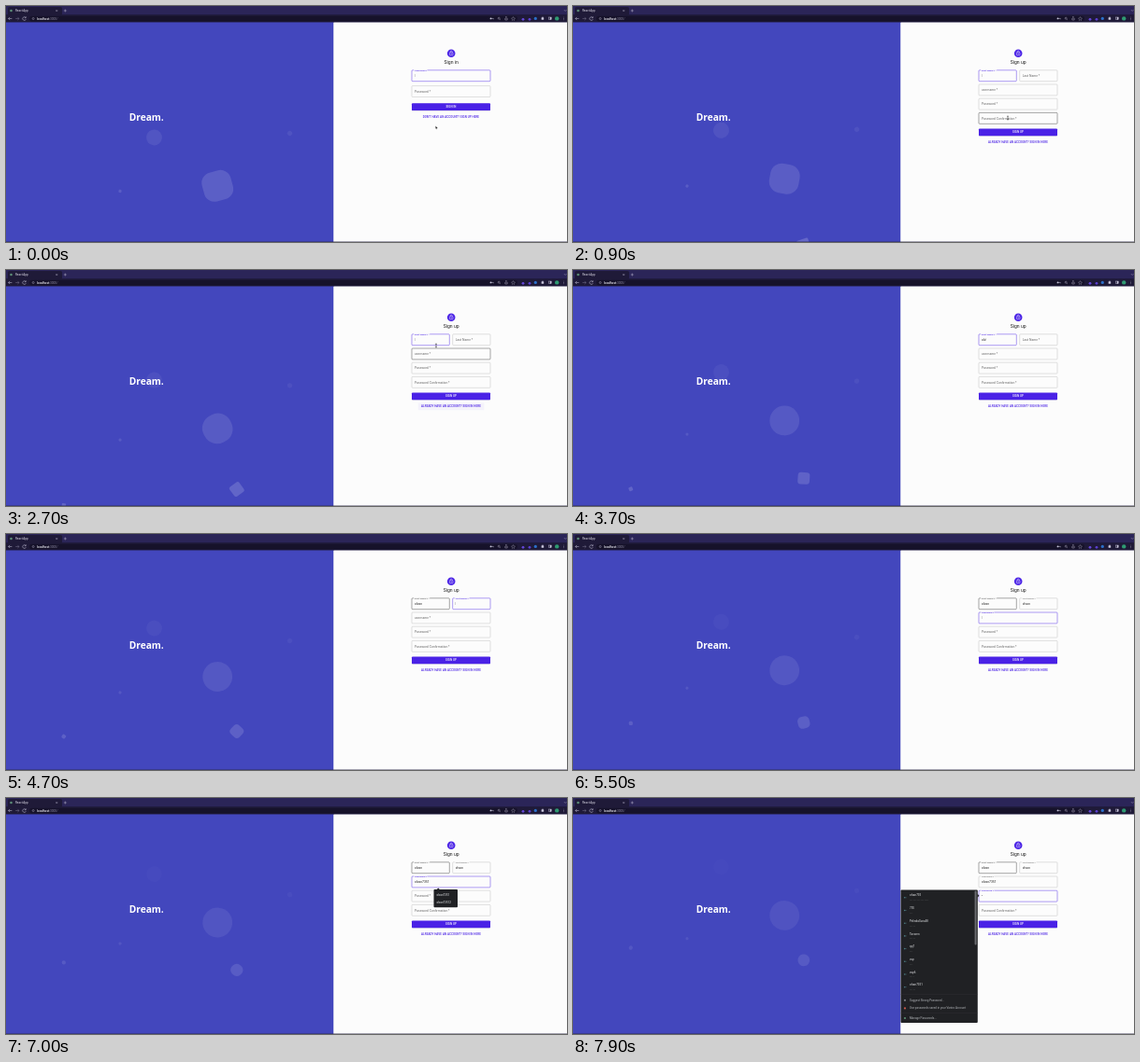
Animation, 600 px wide and 253 px high, one loop 8000 ms. Source, as an HTML page:

```html
<!DOCTYPE html>
<html lang="en">
<head>
<meta charset="utf-8">
<title>Sign up</title>
<style>
  html, body { margin: 0; width: 100%; height: 100%; overflow: hidden; background: #fcfcfc; }
  svg { display: block; width: 100vw; height: 100vh; }
  text { font-family: Roboto, "Liberation Sans", sans-serif; white-space: pre; }
</style>
</head>
<body>
<svg viewBox="0 0 600 253" preserveAspectRatio="none">
  <defs><clipPath id="panel"><rect y="17.5" width="350.5" height="235"/></clipPath></defs>
  <g id="backdrop"></g>
  <g id="bubbles" clip-path="url(#panel)"></g>
  <text x="150.2" y="123.3" text-anchor="middle" fill="#fff"
    style="font: 700 10.2px 'Open Sans', 'Noto Sans', sans-serif">Dream.</text>
  <g id="form"></g>
  <g id="overlay"></g>
</svg>
<script>
const LOOP = 8000, STEP = 100, CSS_PX = 0.212;
const PRIMARY = '#4a22e6', INK = '#222', PAPER = '#fcfcfc';
const layer = id => document.getElementById(id);
const clamp = (v, lo = 0, hi = 1) => Math.min(hi, Math.max(lo, v));

const rect = (x, y, w, h, fill, extra = '') =>
  `<rect x="${x}" y="${y}" width="${w}" height="${h}" fill="${fill}" ${extra}/>`;
const dot = (x, y, r, fill) => `<circle cx="${x}" cy="${y}" r="${r}" fill="${fill}"/>`;
const line = (d, stroke, width = 0.5, fill = 'none') =>
  `<path d="${d}" fill="${fill}" stroke="${stroke}" stroke-width="${width}"/>`;
// y is the vertical middle of the capitals
const text = (s, x, y, size, fill, extra = '') =>
  `<text x="${x}" y="${y + size * 0.36}" font-size="${size}" fill="${fill}" ${extra}>${s}</text>`;
const centered = 'text-anchor="middle"';

function drawBackdrop() {
  const pale = '#c9c6dc';
  return rect(0, 0, 600, 18, '#2b2558')
    + rect(0, 9.2, 600, 8.4, '#1f1a38')
    + rect(2, 1, 58, 9, '#1f1a38', 'rx="1.6"')
    + dot(5.5, 5, 1.3, '#5d8f78')
    + text('React App', 10, 5, 3, '#e6e4f0')
    + line('M53.4 4.2l1.7 1.7m0-1.7l-1.7 1.7M61.8 5h3M63.3 3.5v3', pale, 0.45)
    + line('M597 4.2l1.2 1.2l1.2-1.2', pale, 0.4)
    + line('M6.4 13.5h-3.8m1.6-1.6l-1.6 1.6l1.6 1.6', pale)
    + line('M10.2 13.5h3.8m-1.6-1.6l1.6 1.6l-1.6 1.6', '#77728f')
    + line('M21.1 12.6a1.8 1.8 0 1 0 .2 1.5m0-2.8v1.4h-1.4', pale)
    + rect(25, 10.8, 522, 5.6, '#16122a', 'rx="2.8"')
    + line('M28.2 13.5a1 1 0 1 0 2 0a1 1 0 1 0-2 0', pale, 0.4)
    + text('localhost:<tspan fill="#8b87a0" font-weight="400">3000/</tspan>', 33, 13.5, 3.2, '#f2f1f7', 'font-weight="500"')
    + dot(518.5, 13.4, 0.9, pale) + line('M519 13.4h2.3v.9', pale)
    + line('M526.2 13.2a1 1 0 1 0 2 0a1 1 0 1 0-2 0m1.7.8l.9.9', pale, 0.4)
    + line('M533.8 13v2h2.4v-2M535 14v-2.6m-.8.8l.8-.8l.8.8', pale, 0.4)
    + line('M542.5 11.6l.6 1.3l1.4.2l-1 1l.2 1.4l-1.2-.7l-1.2.7l.2-1.4l-1-1l1.4-.2z', pale, 0.3)
    + dot(553, 14.3, 1.4, '#6447d8') + dot(560, 14.3, 1.4, '#5a3fd0') + dot(566.3, 13.4, 1.6, '#2b6fc9')
    + rect(572.6, 12.2, 2.6, 2.6, pale, 'rx=".6"') + dot(574, 12, 0.6, pale)
    + rect(580.2, 12, 3, 2.7, 'none', `stroke="${pale}" stroke-width=".4"`) + rect(581.8, 12, 1.4, 2.7, pale)
    + dot(589.2, 13.4, 2.2, '#2f9a72')
    + [12, 13.4, 14.8].map(y => dot(596.7, y, 0.35, pale)).join('')
    + rect(0, 17.5, 350.5, 235.5, '#4347bd')
    + rect(350.5, 17.5, 249.5, 235.5, PAPER)
    + rect(0, 252.3, 600, 0.7, '#2b2747', 'opacity=".6"');
}

// centre x, side in CSS px, duration in s, progress at time zero
const bubbles = [
  [158.5, 80, 25, 0.634],
  [226.2, 150, 25, 0.354],
  [303.5, 25, 45, 0.682],
  [122, 15, 35, 0.395],
  [246.8, 60, 18, 0.05],
  [61.8, 20, 12, -0.087],
];

function drawBubbles(t) {
  return bubbles.map(([x, side, duration, start]) => {
    const p = start + t / 1000 / duration;
    if (p < 0 || p >= 1) return '';
    const size = side * CSS_PX, half = size / 2;
    const y = 252 + 150 * CSS_PX - half - p * 1000 * CSS_PX;
    return rect(-half, -half, size, size, '#fff',
      `rx="${Math.min(p, 0.5) * size}" opacity="${0.2 * (1 - p)}"
       transform="translate(${x} ${y}) rotate(${720 * p})"`);
  }).join('');
}

// Typing: word, first key, time per key
const typed = (word, start, pace, t) =>
  word.slice(0, clamp(Math.floor((t - start) / pace) + 1, 0, word.length));

function drawField(f, t, pointer) {
  const focused = t >= f.from && t < f.to;
  const value = f.word ? typed(f.word, f.start, f.pace, t) : '';
  const hovered = pointer.x > f.x && pointer.x < f.x + f.w && pointer.y > f.y && pointer.y < f.y + 11.9;
  const stroke = focused ? PRIMARY : hovered ? INK : '#b4b4b4';
  const raised = focused || value;
  const middle = f.y + 5.9;
  let out = rect(f.x, f.y, f.w, 11.9, 'none', `rx=".85" stroke="${stroke}" stroke-width="${focused ? 0.45 : 0.4}"`);
  if (raised) {
    out += rect(f.x + 2, f.y - 0.6, f.label.length * 1.3 + 1.6, 1.2, PAPER)
      + text(f.label, f.x + 3, f.y, 2.54, focused ? PRIMARY : '#666');
  } else {
    out += text(f.label, f.x + 3, middle, 3.39, '#666');
  }
  out += `<text x="${f.x + 3}" y="${middle + 1.2}" font-size="3.39" fill="#222">${value}`;
  const typing = value && t - f.start < f.pace * f.word.length;
  if (focused && (typing || (t - f.from) % 1000 < 530)) out += '<tspan font-weight="300" dx="-.3">|</tspan>';
  return out + '</text>';
}

const SWITCH = 500, TO_LAST = 4600, TO_USER = 5400, TO_PASS = 7100;
const field = (label, x, y, w, from = LOOP, to = LOOP, word = '', start = LOOP, pace = 100) =>
  ({ label, x, y, w, from, to, word, start, pace });
const signIn = {
  verb: 'in', button: 104.3, link: 'DON\'T HAVE AN ACCOUNT? SIGN UP HERE',
  fields: [
    field('Username *', 434, 68.8, 84, 0, SWITCH),
    field('Password *', 434, 85.6, 84),
  ],
};
const signUp = {
  verb: 'up', button: 131.5, link: 'ALREADY HAVE AN ACCOUNT? SIGN IN HERE',
  fields: [
    field('First Name *', 434, 68.8, 40.3, SWITCH, TO_LAST, 'olvan', 3300, 200),
    field('Last Name *', 477.7, 68.8, 40.3, TO_LAST, TO_USER, 'olvan', 4800, 120),
    field('username *', 434, 84, 84, TO_USER, TO_PASS, 'olvan7351', 5700, 140),
    field('Password *', 434, 99.2, 84, TO_PASS, LOOP, '•', 7700),
    field('Password Confirmation *', 434, 114.4, 84),
  ],
};

function drawForm(t, pointer) {
  const page = t < SWITCH ? signIn : signUp;
  const linkY = page.button + 14.9;
  const glow = page === signUp ? clamp((t - 1350) / 250) * clamp((2850 - t) / 300) : 0;
  return dot(476.2, 50.8, 4.3, PRIMARY)
    + rect(474.4, 50, 3.6, 2.8, 'none', 'rx=".4" stroke="#fff" stroke-width=".45"')
    + line('M475.1 50v-.8a1.1 1.1 0 0 1 2.2 0v.8', '#fff', 0.45)
    + dot(476.2, 51.4, 0.45, '#fff')
    + text('Sign ' + page.verb, 476.2, 60.4, 5.1, INK, centered)
    + page.fields.map(f => drawField(f, t, pointer)).join('')
    + rect(434, page.button + 0.4, 84, 7.7, '#000', 'rx=".85" opacity=".14"')
    + rect(434, page.button, 84, 7.7, PRIMARY, 'rx=".85"')
    + text('SIGN ' + page.verb.toUpperCase(), 476, page.button + 3.9, 2.97, '#fff', centered + ' font-weight="500" letter-spacing=".08"')
    + rect(440.8, linkY - 3.9, 70.6, 7.8, PRIMARY, `rx=".85" opacity="${0.09 * glow}"`)
    + text(page.link, 476, linkY, 2.97, PRIMARY, centered + ' font-weight="500" letter-spacing=".08"');
}

const pointerPath = [
  [0, 460, 130], [300, 462, 122], [500, 465, 120], [900, 465, 120], [1400, 470, 146],
  [2400, 470, 146], [2600, 462, 90], [2700, 460, 81], [2900, 456, 75.5],
];

function pointerAt(t) {
  let i = pointerPath.findIndex(k => k[0] > t);
  if (i < 0) i = pointerPath.length - 1;
  const [t0, x0, y0] = pointerPath[Math.max(0, i - 1)], [t1, x1, y1] = pointerPath[i];
  const k = clamp((t - t0) / (t1 - t0 || 1));
  return { x: x0 + (x1 - x0) * k, y: y0 + (y1 - y0) * k };
}

function drawPointer(t) {
  if (t >= 3300) return '';
  const { x, y } = pointerAt(t);
  const overLink = t < SWITCH ? y < 123 : y > 142;
  const beam = t >= SWITCH && y < 127;
  const shape = beam
    ? line('M-.9-2q.9 0 .9.6v2.8q0 .6-.9.6M.9-2q-.9 0-.9.6M.9 2q-.9 0-.9-.6', '#111', 0.5)
    : overLink
      ? line('M-.3-1.6v2.3l-.8-.5l-.3.5l1.2 1.8h2l.5-1.6v-1l-1.6-.4v-1.1z', '#fff', 0.25, '#111')
      : line('M-.6-1.4v3.1l.8-.6l.5 1.1l.6-.3l-.5-1h1z', '#fff', 0.25, '#111');
  return `<g transform="translate(${x} ${y})">${shape}</g>`;
}

function drawSuggestions() {
  return line('M460.5 98.3l1.8-1.9l1.8 1.9z', 'none', 0, '#202124')
    + rect(457.5, 98, 25.5, 19.2, '#202124', 'rx=".9"')
    + text('olvan7351', 460.4, 103.6, 3, '#e8eaed')
    + text('olvan73512', 460.4, 112, 3, '#e8eaed');
}

const accounts = ['olvan735', '735', 'PelindaSuvo48', 'Tavoren', 'qq7', 'vup', 'vup6', 'olvan7351'];

function drawPasswordMenu() {
  const rows = accounts.map((name, i) => {
    const y = 104.4 + i * 13.7;
    return dot(354.8, y + 2.4, 0.8, '#4f7f86') + line(`M355.4 ${y + 2.4}h1.4`, '#4f7f86', 0.4)
      + text(name, 360, y, 3, '#e8eaed')
      + text('•'.repeat(i ? Math.min(name.length, 5) : 16), 360, y + 5, 2.4, '#85888c', 'letter-spacing=".5"');
  }).join('');
  const footer = [
    [216.8, 'Suggest Strong Password...', '#7b7f85'],
    [225.4, 'Use passwords saved in your Vantro Account', '#c4574c'],
    [236, 'Manage Passwords...', '#5c8f72'],
  ].map(([y, label, tint]) => dot(355, y, 1.1, tint) + text(label, 360, y, 3, '#b4b7bb')).join('');
  return line('M432.6 102.8l1.8 2l-1.8 2z', 'none', 0, '#202124')
    + rect(350.5, 98.5, 82.3, 142.5, '#202124', 'rx=".9"')
    + rect(350.5, 210.3, 82.3, 0.3, '#36383c') + rect(350.5, 230.7, 82.3, 0.3, '#36383c')
    + rect(429.6, 99.5, 2, 58, '#6a6c70', 'rx="1"')
    + rows + footer;
}

function render(t) {
  layer('bubbles').innerHTML = drawBubbles(t);
  layer('form').innerHTML = drawForm(t, pointerAt(t - STEP));
  layer('overlay').innerHTML = drawPointer(t)
    + (t >= 5800 && t < TO_PASS ? drawSuggestions() : '')
    + (t >= TO_PASS ? drawPasswordMenu() : '');
}

layer('backdrop').innerHTML = drawBackdrop();
const begin = performance.now();
let shown = -1;
function tick() {
  const t = Math.floor((performance.now() - begin) % LOOP / STEP) * STEP;
  if (t !== shown) render(shown = t);
  requestAnimationFrame(tick);
}
tick();
</script>
</body>
</html>
```
